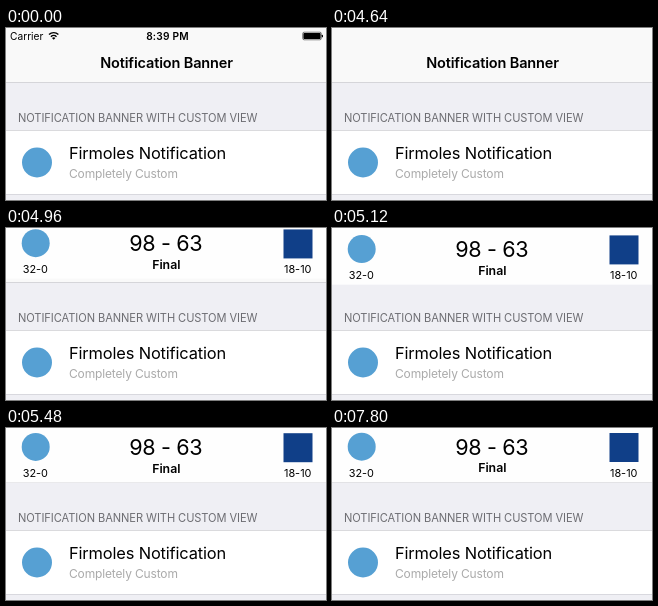
Write an HTML page that moves like this. It is 320x172 px and loops after 8 s.

```html
<!DOCTYPE html>
<html lang="en">
<head>
<meta charset="utf-8">
<title>Notification banner</title>
<style>
  html, body { margin: 0; width: 100%; height: 100%; overflow: hidden; background: #efeff4; }
  svg { display: block; width: 100vw; height: 100vh; }
  text { font-family: Inter, Roboto, "Liberation Sans", sans-serif; fill: #000; white-space: pre; }
  .mid { text-anchor: middle; }
  .semi { font-weight: 600; }
  .small { font-size: 10.2px; }
  .title { font-size: 14.5px; letter-spacing: -.15px; }
  .section { font-size: 11.1px; letter-spacing: -.07px; fill: #6d6d72; }
  .name { font-size: 16.4px; letter-spacing: -.15px; }
  .detail { font-size: 12px; letter-spacing: -.15px; fill: #aaa; }
  .score { font-size: 21.6px; letter-spacing: -.4px; }
  .final { font-size: 12.3px; }
  .record { font-size: 10.9px; }
  .hairline { fill: #b4b4ba; }
  .home { fill: #56a0d3; }
  .away { fill: #103f88; }
</style>
</head>
<body>
<svg viewBox="0 0 320 172">
  <rect width="320" height="172" fill="#efeff4"/>

  <rect width="320" height="54.4" fill="#f9f9f9"/>
  <rect class="hairline" y="54.4" width="320" height=".5"/>
  <text class="title semi mid" x="160.5" y="40">Notification Banner</text>

  <g id="status">
    <text class="small" x="4" y="11.7">Carrier</text>
    <g fill="none" stroke="#000" stroke-width="1.4">
      <path d="M43 6.6 A6.6 6.6 0 0 1 52.4 6.6"/>
      <path d="M44.9 8.7 A4 4 0 0 1 50.5 8.7"/>
    </g>
    <path d="M47.7 11.7 L46 10 A2.4 2.4 0 0 1 49.4 10 Z"/>
    <text class="small semi mid" x="161.5" y="11.7" letter-spacing=".2">8:39 PM</text>
    <rect x="296.7" y="4.2" width="18.6" height="7.6" rx="1.4" fill="none" stroke="#000" stroke-width=".5"/>
    <rect x="297.4" y="4.9" width="17.2" height="6.2" rx=".8"/>
    <rect x="315.8" y="6.7" width="1.2" height="2.6" rx=".6"/>
  </g>

  <text class="section" x="12" y="94">NOTIFICATION BANNER WITH CUSTOM VIEW</text>
  <rect y="102" width="320" height="64" fill="#fff"/>
  <rect class="hairline" y="102" width="320" height=".5"/>
  <rect class="hairline" y="166" width="320" height=".4"/>
  <circle class="home" cx="31" cy="134.5" r="15"/>
  <text class="name" x="63" y="131.3">Firmoles Notification</text>
  <text class="detail" x="63" y="150.2">Completely Custom</text>

  <g id="banner">
    <rect y="-10" width="320" height="64.3" fill="#fefefe"/>
    <circle class="home" cx="29.7" cy="18.7" r="14"/>
    <text class="record mid" x="29.3" y="48.8">32-0</text>
    <text class="score mid" x="159.7" y="26.9">98 - 63</text>
    <text class="final semi mid" x="160.3" y="44.3">Final</text>
    <rect class="away" x="277.5" y="5" width="29" height="29"/>
    <text class="record mid" x="291.7" y="48.8">18-10</text>
  </g>
</svg>
<script>
  const LOOP = 8000, STEP = 40;
  const HIDE_STATUS = 4640, SLIDE_START = 4620;
  const HEIGHT = 54.6, DAMPING = 0.7, FREQUENCY = 5.9;
  const RATIO = DAMPING / Math.sqrt(1 - DAMPING ** 2);
  const statusBar = document.getElementById("status");
  const banner = document.getElementById("banner");

  // Distance left in an underdamped spring, from 1 towards 0.
  function springRest(seconds) {
    const a = FREQUENCY * Math.max(0, seconds);
    return Math.exp(-RATIO * a) * (Math.cos(a) + RATIO * Math.sin(a));
  }

  function render(ms) {
    const t = Math.floor((ms % LOOP + 0.5) / STEP) * STEP;
    const shown = t >= HIDE_STATUS;
    const y = -HEIGHT * springRest((t - SLIDE_START) / 1000);
    statusBar.style.display = shown ? "none" : "";
    banner.style.display = shown ? "" : "none";
    banner.setAttribute("transform", `translate(0 ${y.toFixed(2)})`);
  }

  const start = performance.now();
  function frame() {
    render(performance.now() - start);
    requestAnimationFrame(frame);
  }
  frame();
</script>
</body>
</html>
```
